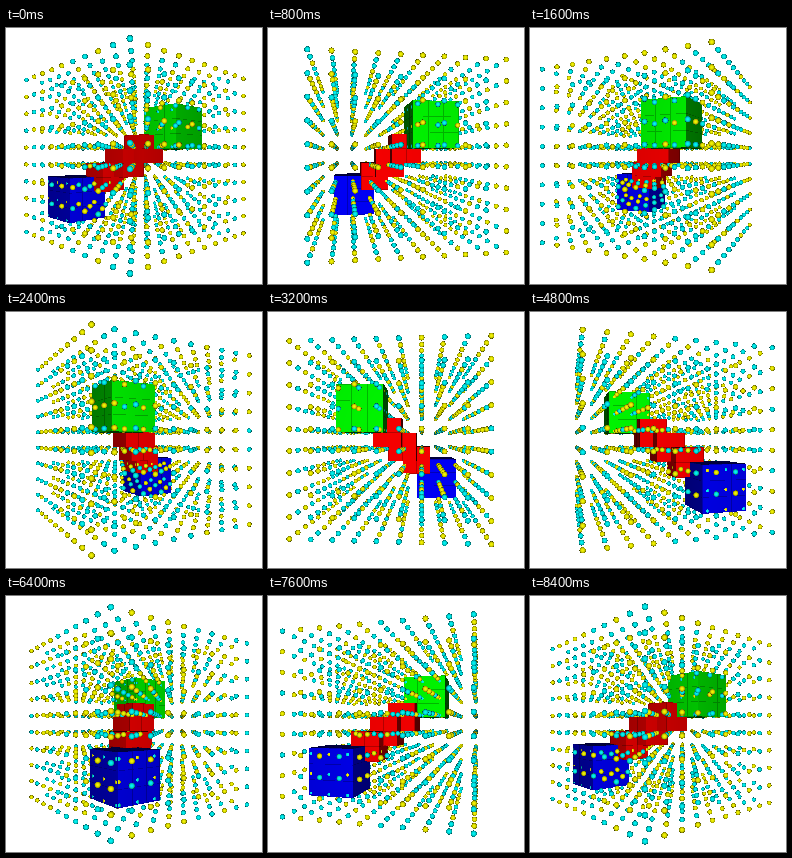
An HTML page with a canvas for the animation above (8500 ms loop, 256 by 256 pixels).

```html
<!DOCTYPE html>
<html>
<head>
<meta charset="utf-8">
<style>
html, body { margin: 0; width: 100%; height: 100%; overflow: hidden; background: #fff; }
canvas { display: block; width: 256px; height: 256px; }
</style>
</head>
<body>
<canvas id="stage" width="256" height="256"></canvas>
<script>
const SIZE = 256;
const STEP_MS = 100, STEPS = 85;
const START = -1.4, TURN = -4.3226;      // degrees, degrees per step
const FOCAL = 313, DIST = 22.94;         // distances are in voxel units
const CX = 128, CY = 128;
const GAP = 1.25, RADIUS = 0.165;

const CYAN = [0, 255, 255], YELLOW = [255, 255, 0];
const RED = [255, 0, 0], GREEN = [0, 255, 0], BLUE = [0, 0, 255];

const box = (color, x, y, z, size) => ({
  color, lo: [x - 0.5, y - 0.5, z - 0.5], hi: [x + size - 0.5, y + size - 0.5, z + size - 0.5]
});
const boxes = [
  box(GREEN, 1, 1, -3, 3),
  box(RED, 0, 0, -1, 2),
  box(RED, -1, -1, 0, 2),
  box(RED, -2, -2, 1, 2),
  box(BLUE, -4, -4, 2, 3)
];

let seed = 7;
function random() {
  seed = (Math.imul(seed, 1664525) + 1013904223) >>> 0;
  return seed / 4294967296;
}

// Two-coloured lattice, mirrored top to bottom.
const balls = [];
for (let i = 0; i < 10; i++)
  for (let k = 0; k < 10; k++)
    for (let j = 0; j < 5; j++) {
      const corner = [i, j, k].every(n => n % 9 === 0);
      const pick = random() < 0.5;
      const color = (corner ? k === 9 : pick) ? CYAN : YELLOW;
      for (const row of [j, 9 - j])
        balls.push({ x: (i - 4.5) * GAP, y: (row - 4.5) * GAP, z: (k - 4.5) * GAP, color });
    }

const ctx = document.getElementById("stage").getContext("2d");
const image = ctx.createImageData(SIZE, SIZE);
const pixels = image.data;
const depth = new Float32Array(SIZE * SIZE);

const shade = facing => 0.18 + 0.78 * facing;

function plot(x, y, d, color, light) {
  const p = y * SIZE + x;
  if (d >= depth[p]) return;
  depth[p] = d;
  for (let c = 0; c < 3; c++) pixels[p * 4 + c] = color[c] * light;
}

function drawBall(ball, view) {
  const side = ball.x * view.sx + ball.z * view.sz;
  const dist = DIST - ball.x * view.cx - ball.z * view.cz;
  const scale = FOCAL / dist, r = RADIUS * scale;
  const bx = CX + side * scale, by = CY - ball.y * scale;
  const x0 = Math.max(0, Math.floor(bx - r)), x1 = Math.min(SIZE - 1, Math.ceil(bx + r));
  const y0 = Math.max(0, Math.floor(by - r)), y1 = Math.min(SIZE - 1, Math.ceil(by + r));
  for (let y = y0; y <= y1; y++)
    for (let x = x0; x <= x1; x++) {
      const dx = (x + 0.5 - bx) / r, dy = (y + 0.5 - by) / r;
      const rest = 1 - dx * dx - dy * dy;
      if (rest <= 0) continue;
      const nz = Math.sqrt(rest);
      plot(x, y, dist - RADIUS * nz, ball.color, shade(nz));
    }
}

// Screen rectangle around the eight projected corners.
function bounds(b, view) {
  let x0 = SIZE, y0 = SIZE, x1 = 0, y1 = 0;
  for (let n = 0; n < 8; n++) {
    const [x, y, z] = [0, 1, 2].map(a => (n >> a & 1 ? b.hi : b.lo)[a]);
    const scale = FOCAL / (DIST - x * view.cx - z * view.cz);
    const px = CX + (x * view.sx + z * view.sz) * scale, py = CY - y * scale;
    x0 = Math.min(x0, px); x1 = Math.max(x1, px);
    y0 = Math.min(y0, py); y1 = Math.max(y1, py);
  }
  return [Math.floor(x0), Math.floor(y0), Math.ceil(x1), Math.ceil(y1)];
}

// Casts a ray per pixel; the lamp sits at the eye.
function drawBox(b, view) {
  const eye = [DIST * view.cx, 0, DIST * view.cz];
  const dir = [0, 0, 0];
  const [x0, y0, x1, y1] = bounds(b, view);
  for (let y = y0; y < y1; y++)
    for (let x = x0; x < x1; x++) {
      const px = (x + 0.5 - CX) / FOCAL;
      dir[0] = px * view.sx - view.cx;
      dir[1] = (CY - y - 0.5) / FOCAL;
      dir[2] = px * view.sz - view.cz;
      let near = -Infinity, far = Infinity, axis = 0;
      for (let a = 0; a < 3; a++) {
        const ta = (b.lo[a] - eye[a]) / dir[a], tb = (b.hi[a] - eye[a]) / dir[a];
        const t = Math.min(ta, tb);
        if (t > near) { near = t; axis = a; }
        far = Math.min(far, Math.max(ta, tb));
      }
      if (near >= far) continue;
      let light = shade(Math.abs(dir[axis]) / Math.hypot(...dir));
      for (let a = 0; a < 3; a++) {
        if (a === axis) continue;
        const q = eye[a] + dir[a] * near + 0.5;
        if (Math.abs(q - Math.round(q)) < 0.018) { light *= 0.75; break; }
      }
      plot(x, y, near, b.color, light);
    }
}

function render(step) {
  const turn = START + TURN * step;
  const a = (turn + 45) * Math.PI / 180, b = (turn - 45) * Math.PI / 180;
  const view = { sx: Math.sin(a), cx: Math.cos(a), sz: Math.sin(b), cz: Math.cos(b) };
  pixels.fill(255);
  depth.fill(Infinity);
  boxes.forEach(item => drawBox(item, view));
  balls.forEach(item => drawBall(item, view));
  ctx.putImageData(image, 0, 0);
}

let shown = -1;
const begin = performance.now();
function tick() {
  const step = Math.floor((performance.now() - begin) / STEP_MS) % STEPS;
  if (step !== shown) render(shown = step);
  requestAnimationFrame(tick);
}
tick();
</script>
</body>
</html>
```
